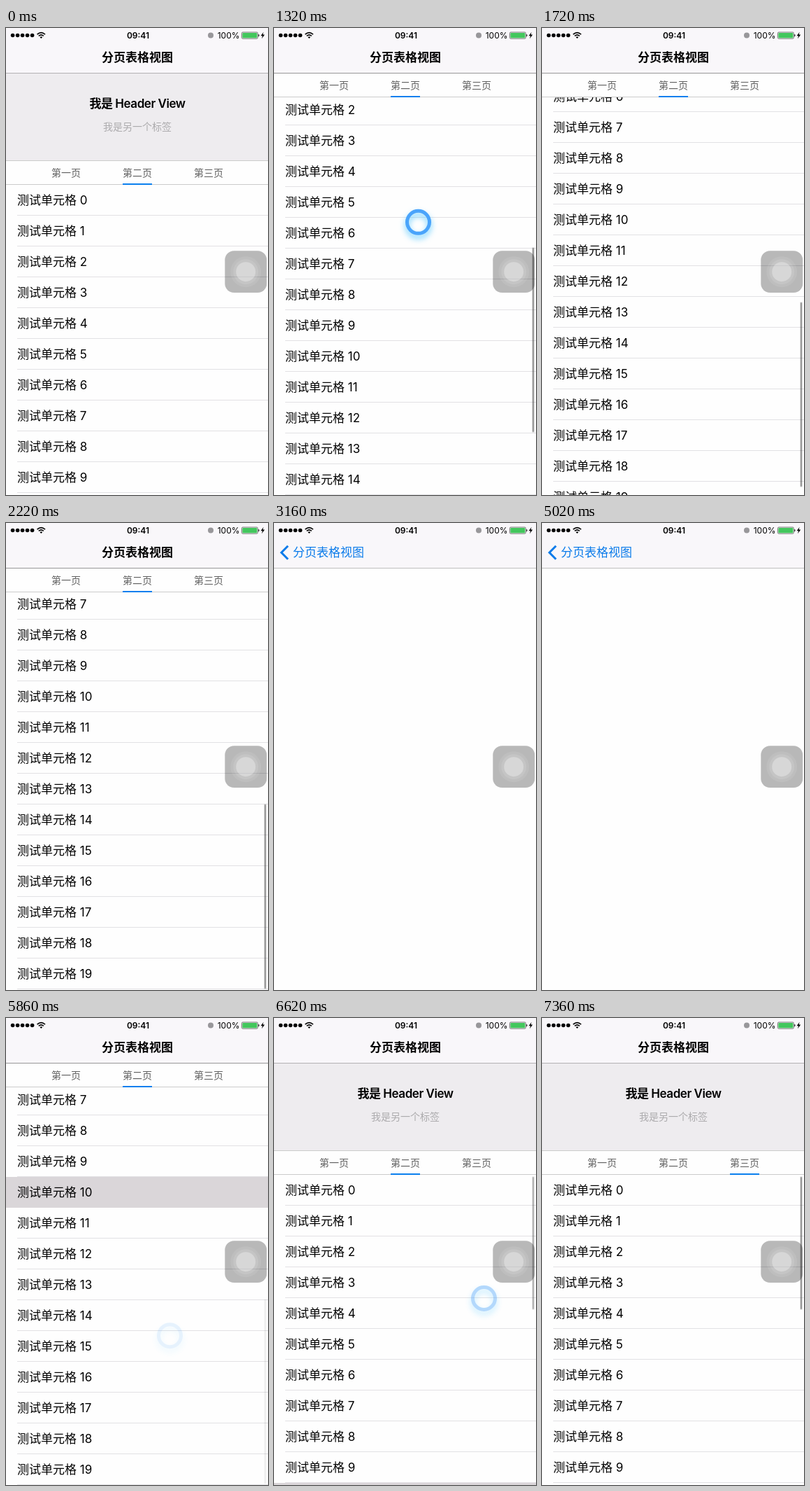
An HTML page for the animation above (7.56 s loop, 375 px wide and 667 px high).

```html
<!DOCTYPE html>
<html lang="zh-CN">
<head>
<meta charset="utf-8">
<title>分页表格视图</title>
<style>
html, body { margin: 0; width: 100%; height: 100%; overflow: hidden; background: #fefefe; }
#stage { position: absolute; left: 0; top: 0; width: 375px; height: 667px; overflow: hidden;
  background: #fefefe; color: #000; font: 17px/44px Inter, "Noto Sans CJK SC", "Noto Sans CJK JP", "Noto Sans CJK", sans-serif; white-space: nowrap; }
#stage div, #stage svg { position: absolute; }
.full { left: 0; top: 0; width: 375px; height: 667px; }
#main { background: #fefefe; }
.list { top: 0; width: 375px; height: 667px; overflow: hidden; }
.rows { left: 0; top: 224px; width: 375px; }
.row { left: 0; width: 359px; height: 44px; padding-left: 16px; }
.row::after { content: ""; position: absolute; left: 16px; right: 0; bottom: 0; height: 1px; background: #e2e1e4; }
.row.on { background: #dad6d9; }
.row.on::after { display: none; }
.bar { left: 370px; width: 2px; border-radius: 1px; background: rgba(0,0,0,.4); box-shadow: 0 0 0 1px rgba(0,0,0,.13); }
#header { left: 0; top: 64px; width: 375px; height: 125px; background: #eeecef; text-align: center; }
#header div { left: 0; width: 376px; }
#big { top: 22px; font-weight: 600; letter-spacing: -.45px; }
#small { top: 55px; font-size: 14px; color: #acabad; }
#tabs { left: 0; top: 189px; width: 375px; height: 35px; background: #fefefe; font-size: 14px; line-height: 35px; color: #606060; }
#tabs::before, #tabs::after { content: ""; position: absolute; left: 0; width: 375px; height: 1px; background: rgba(0,0,0,.2); }
#tabs::before { top: 0; }
#tabs::after { bottom: 0; }
#line { z-index: 1; left: 167px; top: 33px; width: 42px; height: 2px; background: #0a7fee; }
#dim { background: #000; }
#detail { background: #fefefe; box-shadow: 0 0 9px rgba(0,0,0,.25); }
#nav { left: 0; top: 0; width: 375px; height: 64px; background: #f9f7fa; }
#nav::after { content: ""; position: absolute; left: 0; top: 64px; width: 375px; height: 1px; background: rgba(0,0,0,.25); }
.title { left: 137px; top: 20px; }
#title { font-weight: 600; }
#back { color: #0a7bea; }
.stat { top: 0; font-size: 12px; line-height: 21px; }
#touch { left: -18.5px; top: -18.5px; width: 27px; height: 27px; border: 5px solid #4aa4fb; border-radius: 50%;
  filter: drop-shadow(0 5px 4px rgba(70,195,255,.8)); }
</style>
</head>
<body>
<div id="stage">
  <div id="main" class="full">
    <div id="pages" class="full"></div>
    <div id="header"><div id="big">我是 Header View</div><div id="small">我是另一个标签</div></div>
    <div id="tabs">
      <div style="left:65px">第一页</div><div style="left:167px">第二页</div><div style="left:269px">第三页</div>
      <div id="line"></div>
    </div>
    <div id="dim" class="full"></div>
  </div>
  <div id="detail" class="full"></div>
  <div id="nav">
    <div id="title" class="title">分页表格视图</div>
    <div id="back" class="title">分页表格视图</div>
    <svg id="chevron" class="full" viewBox="0 0 375 667"><path d="M20 32.8L10.6 42.3L20 51.8" fill="none" stroke="#0a7bea" stroke-width="3"/></svg>
    <svg class="full" viewBox="0 0 375 667">
      <g id="dots"></g>
      <g fill="none" stroke="#000" stroke-width="1.7">
        <path d="M44.6 9.1Q50.3 4 56 9.1"/><path d="M46.8 11.4Q50.3 8.4 53.8 11.4"/>
      </g>
      <path d="M48.4 13Q50.3 11.5 52.2 13L50.3 15Z"/>
      <circle cx="293" cy="10.5" r="4" fill="#98979a"/>
      <rect x="337.4" y="6" width="23" height="9.2" rx="1.6" fill="none" stroke="#555" stroke-width=".8"/>
      <rect x="338.4" y="7" width="21" height="7.2" rx=".8" fill="#43c75d"/>
      <path d="M361.2 9h.6q.8.4.8 1.6t-.8 1.6h-.6z" fill="#333"/>
      <path d="M368.6 5.8L364.6 11.2H367.1L366 15.2L370.2 9.6H367.6Z"/>
    </svg>
    <div class="stat" style="left:139px;width:100px;text-align:center;font-weight:600">09:41</div>
    <div class="stat" style="right:40.5px">100%</div>
  </div>
  <svg class="full" viewBox="0 0 375 667">
    <rect x="313.3" y="318.2" width="59.9" height="59.9" rx="13" fill="#000" fill-opacity=".28"/>
    <g fill="#fff"><circle cx="343.2" cy="348.2" r="22" fill-opacity=".08"/><circle cx="343.2" cy="348.2" r="18" fill-opacity=".1"/><circle cx="343.2" cy="348.2" r="14" fill-opacity=".31"/></g>
  </svg>
  <div id="touch"></div>
</div>
<script>
const LOOP = 7560, END = 437, ROWS = 20, PICKED = 10;
const $ = id => document.getElementById(id);
const clamp = x => Math.max(0, Math.min(1, x));
const ramp = (t, from, len) => clamp((t - from) / len);
const move = (el, x, y) => { el.style.transform = `translate(${x}px,${y}px)`; };

$('dots').innerHTML = [0, 1, 2, 3, 4].map(i => `<circle cx="${9.6 + i * 7}" cy="10.5" r="2.8"/>`).join('');

function makeList(left) {
  const list = document.createElement('div');
  list.className = 'list';
  list.style.left = left + 'px';
  const rows = Array.from({ length: ROWS }, (_, i) =>
    `<div class="row" style="top:${i * 44}px">测试单元格 ${i}</div>`).join('');
  list.innerHTML = `<div class="rows">${rows}</div><div class="bar"></div>`;
  $('pages').append(list);
  return { rows: list.firstChild, bar: list.lastChild };
}
const second = makeList(0), third = makeList(375);
const picked = second.rows.children[PICKED];

// A finger drag followed by a damped run to the final position.
function flick(t, start, len, dist, pow, total, k) {
  const u = (t - start) / len;
  if (u <= 0) return 0;
  if (u < 1) return dist * u ** pow;
  const rest = total - dist, v = dist * pow / len, s = t - start - len;
  return total - (rest + (k * rest - v) * s) * Math.exp(-k * s);
}

function spring(t, start, len) {
  if (t <= start) return 0;
  if (t >= start + len) return 1;
  const a = (t - start) * .014;
  return 1 - (1 + a) * Math.exp(-a);
}

const up = t => flick(t, 1040, 340, 268, 1.104, END, .00385);
const down = t => flick(t, 5860, 210, 200, 1.3, END, .014);
const page = t => t > 7290 ? 375 : flick(t, 6640, 220, 200, 1.2, 375, .015);

function scrollAt(t) {
  if (t < 4000) return up(t);
  return t > 6590 ? 0 : END - down(t);
}

const touches = [
  { on: 980, off: 1380, at: t => [206, 494 - up(t)] },
  { on: 2300, off: 2450, at: () => [190, 248] },
  { on: 5030, off: 5140, at: () => [46, 42] },
  { on: 5848, off: 6070, at: t => [234, 453 + down(t)] },
  { on: 6580, off: 6860, at: t => [300 - page(t), 400] }
];

function drawTouch(t) {
  const g = touches.find(g => t >= g.on && t < g.off + 160);
  $('touch').style.opacity = g ? ramp(t, g.on, 100) * (1 - ramp(t, g.off, 160)) : 0;
  if (g) move($('touch'), ...g.at(t));
}

function drawBar(bar, s, alpha) {
  const top = 227 + .4 * s;
  bar.style.top = top + 'px';
  bar.style.height = Math.min(189 + 74 * clamp(s / 125), 665 - top) + 'px';
  bar.style.opacity = alpha;
}

function draw(t) {
  const s = Math.round(scrollAt(t)), x = page(t), fold = Math.min(s, 125);
  move($('header'), 0, -fold);
  move($('tabs'), 0, -fold);
  move($('line'), 102 * x / 375, 0);
  move($('pages'), -Math.round(x), 0);
  move(second.rows, 0, -s);
  drawBar(second.bar, s, t < 4000
    ? ramp(t, 1040, 100) * (1 - ramp(t, 2240, 240))
    : ramp(t, 5845, 100) * (1 - ramp(t, 6560, 240)));
  drawBar(third.bar, 0, ramp(t, 7280, 80));
  picked.classList.toggle('on', t >= 2450);

  const p = spring(t, 2560, 600) - spring(t, 5180, 570);
  move($('main'), Math.round(-112 * p), 0);
  move($('detail'), Math.round(375 * (1 - p)), 0);
  $('detail').style.visibility = p > 0 ? 'visible' : 'hidden';
  $('dim').style.opacity = .1 * p;
  move($('title'), -110 * p, 0);
  move($('back'), -110 * p, 0);
  $('title').style.opacity = 1 - p;
  $('back').style.opacity = $('chevron').style.opacity = p;
  drawTouch(t);
}

const begin = performance.now();
function tick() {
  draw((performance.now() - begin) % LOOP);
  requestAnimationFrame(tick);
}
draw(0);
requestAnimationFrame(tick);
</script>
</body>
</html>
```
